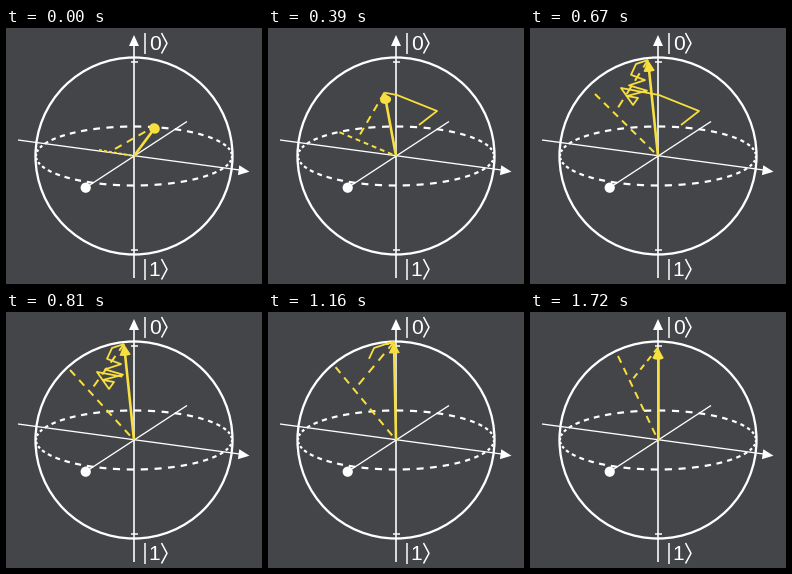
A matplotlib script that plays this animation: 256 by 256 pixels, repeating every 1.78 s.

```python
import numpy as np
import matplotlib.pyplot as plt
from matplotlib.animation import FuncAnimation
from matplotlib.patches import Circle, Polygon

SIZE, DPI = 256, 64
PX = 72 / DPI  # points per pixel
BG, WHITE, YELLOW = "#444549", "#ffffff", "#f6df3f"
ORIGIN = np.array([128, 128])
POLE = np.array([128, 35.5])
RADIUS, TILT = 98.5, 29.5
LOOP_MS, TICK_MS = 1780, 10
STARTS = np.r_[0, np.linspace(260, 530, 5), np.arange(600, LOOP_MS - 10, 70)]
COLLAPSE = 17  # step at which the state reaches the pole


def along(t, knots, points):
    """Piecewise linear motion through a few key points."""
    x, y = np.array(points, float).T
    return np.stack([np.interp(t, knots, x), np.interp(t, knots, y)], axis=-1)


def tip_path():
    """Wander left, zigzag upwards, hover near the pole, then rest on it."""
    wander = along(np.arange(10), (0, 1, 3, 6, 8, 9),
                   [(151, 97), (169, 83), (129, 67), (91, 60), (103, 77), (108, 70)])
    k = np.arange(5)
    zigzag = np.c_[107.5 - (-1.0) ** k * (10.5 - k), 68 - 5.3 * k]
    swing = np.arange(10) % 4 == 3
    hover = np.c_[118 + 8 * swing, 32 - 2 * swing]
    return np.vstack([wander, zigzag, (106, 36), hover, np.tile(POLE, (6, 1))])


PATH = tip_path()

fig = plt.figure(figsize=(SIZE / DPI, SIZE / DPI), dpi=DPI, facecolor=BG)
ax = fig.add_axes([0, 0, 1, 1])
ax.set_xlim(0, SIZE)
ax.set_ylim(SIZE, 0)
ax.axis("off")


def stroke(points, color, width, z=2):
    x, y = np.asarray(points, float).T
    line, = ax.plot(x, y, color=color, lw=width * PX, zorder=z,
                    solid_capstyle="butt", solid_joinstyle="round")
    return line


def dashes(a, b, count, fill=0.56):
    """Equal dashes from a to b, separated by NaN rows."""
    a, b = np.asarray(a, float), np.asarray(b, float)
    rows = []
    for i in range(count):
        rows += [a + (b - a) * i / count,
                 a + (b - a) * (i + fill) / count, (np.nan, np.nan)]
    return np.array(rows)


def cone(tip, length=11, half=5.5):
    """Base ellipse and side triangle of a foreshortened arrowhead."""
    v = np.asarray(tip, float) - ORIGIN
    reach = np.hypot(*v)
    u = v / reach
    n = np.array([-u[1], u[0]])
    f = min(reach / RADIUS, 1)
    base = tip - u * length * f
    t = np.linspace(0, 2 * np.pi, 40)[:, None]
    disc = base + half * (np.cos(t) * n + np.sqrt(1 - f * f) * np.sin(t) * u)
    return disc, np.array([tip, base + half * n, base - half * n])


def label(digit, y):
    stroke([(138.5, y - 10.5), (138.5, y + 11)], WHITE, 1.5)
    stroke([(155.5, y - 10), (161, y + 0.3), (155.5, y + 10.5)], WHITE, 1.5)
    ax.text(148.5, y + 7.5, digit, color=WHITE, fontsize=21 * PX,
            family="Liberation Sans", ha="center", va="baseline")


def sphere():
    ax.add_patch(Circle(ORIGIN, RADIUS, fill=False, ec=WHITE, lw=2.3 * PX))
    count = 44
    for i in range(count):
        t = 2 * np.pi * (i + np.linspace(0, 0.52, 6)) / count
        stroke(np.c_[128 + 98 * np.cos(t), 128 + TILT * np.sin(t)], WHITE, 2.2)
    stroke([(128, 250), (128, 12)], WHITE, 1.6)
    stroke([(12, 112), (238, 142.6)], WHITE, 1.3)
    stroke([(181, 93.5), (80, 159.5)], WHITE, 1.3)
    for y in (34, 222):
        stroke([(124.5, y), (131.5, y)], WHITE, 1.5)
    for tip in ((128, 7), (243.5, 143.7)):
        ax.add_patch(Polygon(cone(tip, half=5)[1], fc=WHITE, lw=0, zorder=3))
    ax.add_patch(Circle((79.7, 159.7), 5.1, fc=WHITE, lw=0, zorder=3))
    label("0", 15)
    label("1", 241)


sphere()
nothing = [(0, 0)]
trail = stroke(nothing, YELLOW, 1.8, 4)
meter = stroke(nothing, YELLOW, 2, 4)
drop = stroke(nothing, YELLOW, 2, 4)
vector = stroke(nothing, YELLOW, 2.6, 5)
head = [ax.add_patch(Polygon(np.zeros((3, 2)), fc=YELLOW, lw=0, zorder=6))
        for _ in range(2)]


def axis_end(step):
    """The measurement axis drifts, then snaps towards the pole."""
    if step >= COLLAPSE:
        return np.array([88, 44])
    return along(step, (0, 1, 5, 7, 9, 16),
                 [(93, 122), (78, 102), (52, 111), (65, 66), (64, 58), (69, 54)])


def draw(frame):
    step = np.searchsorted(STARTS, frame * TICK_MS, side="right") - 1
    last = int(np.interp(step, (0, 1, 5, 7, 22), (0, 3, 7, 16, 31)))
    first = int(np.interp(step, (7, 11, 22), (0, 8, 31)))
    tip, end = PATH[last], axis_end(step)
    foot = ORIGIN + 0.69 * (end - ORIGIN)
    disc, side = cone(tip)
    trail.set_data(*PATH[first:last + 1].T)
    meter.set_data(*dashes(end, ORIGIN, 7).T)
    drop.set_data(*dashes(tip, foot, 4).T)
    vector.set_data(*np.array([ORIGIN, side[1:].mean(axis=0)]).T)
    for patch, shape in zip(head, (disc, side)):
        patch.set_xy(shape)
    return [trail, meter, drop, vector, *head]


anim = FuncAnimation(fig, draw, frames=LOOP_MS // TICK_MS, interval=TICK_MS,
                     repeat=True, repeat_delay=0, blit=False)
plt.show()
```
